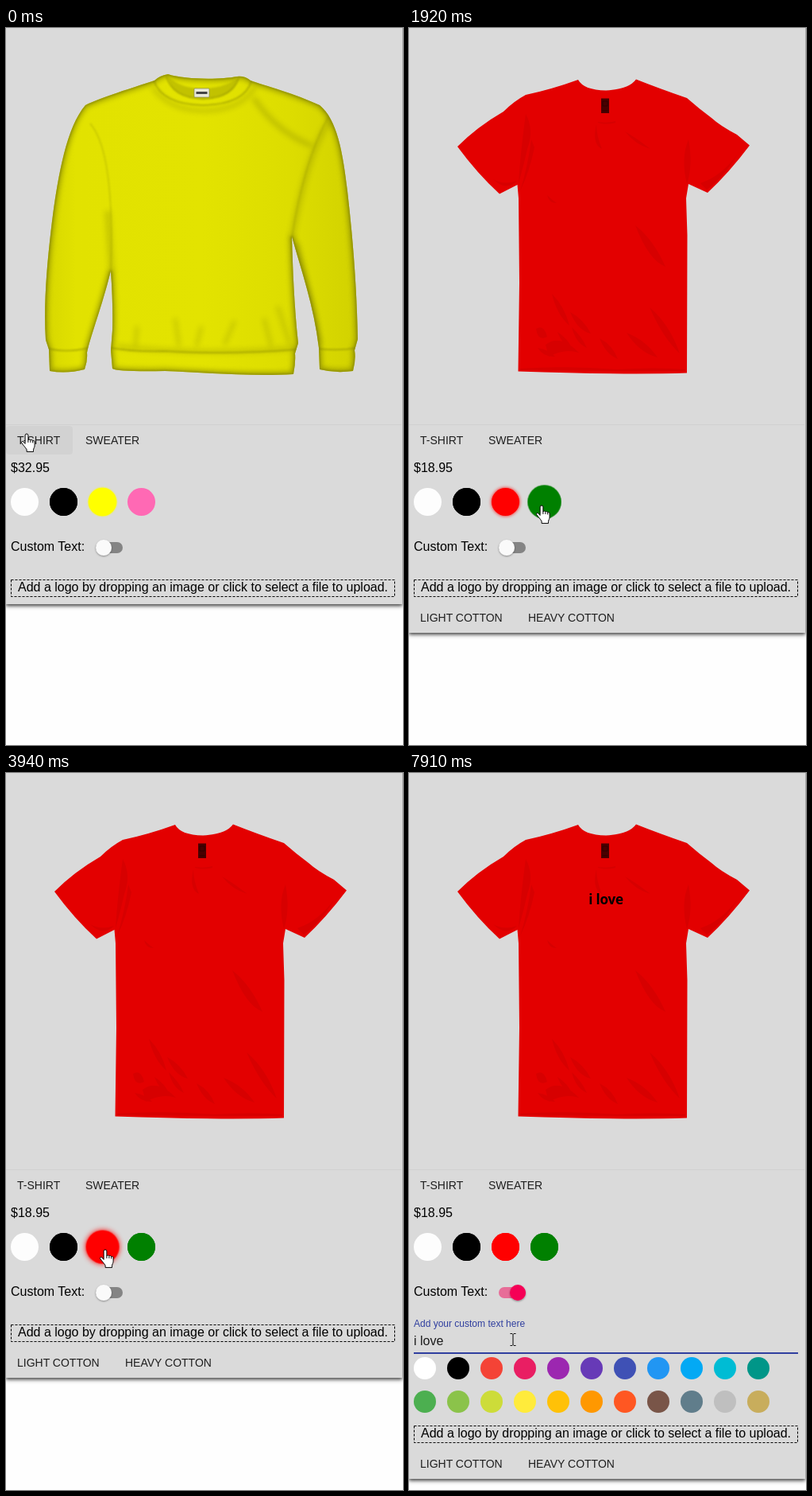
Animation, 500 px wide and 901 px high, one loop 8000 ms. Source, as an HTML page:

```html
<!DOCTYPE html>
<html lang="en">
<head>
<meta charset="utf-8">
<title>Shirt designer</title>
<style>
html, body { margin: 0; width: 100%; height: 100%; overflow: hidden; background: #fefefe; }
#stage { position: relative; width: 500px; height: 901px; overflow: hidden; }
#card { position: absolute; left: 0; top: -6px; width: 498.5px; height: 730px; background: #dadada;
  box-shadow: 0 2px 4px rgba(0,0,0,.65), 0 3px 6px rgba(0,0,0,.2); }
svg { position: absolute; left: 0; top: 0; }
text { font-family: "Liberation Sans", Arial, sans-serif; font-size: 16px; white-space: pre; }
.btn { font-size: 14px; fill: #1f1f1f; }
.hint { font-size: 12px; fill: #303f9f; }
.print { font: 700 17px "Open Sans", sans-serif; letter-spacing: -.2px; --lag: .12s; }

/* every timeline shares one 8 s loop */
#card, .step { animation: 8s step-end infinite; }
.move { animation: 8s linear infinite; }
#card { animation-name: grow; }
.sweater { animation-name: sweater; }
.tee { animation-name: tee; }
.shine { animation-name: shine; }
.dye { animation-name: dye; }
.low { animation-name: low; }
.mid { animation-name: mid; }
.drop { animation-name: drop; }
.field { animation-name: field; }
.typed { animation-name: typed; }
.caret { animation-name: caret; }
.track { animation-name: track; }
.hand { animation-name: hand; }
.arrow { animation-name: arrow; }
.beam { animation-name: beam; }
.cursor { animation-name: cursor; }
.hover { animation-name: hover; }
.ripple { animation-name: ripple; transform-origin: 32px 523px; }
.thumb { animation-name: thumb; }
.rule { animation-name: rule; }
.rule, .swatch { transform-box: fill-box; transform-origin: center; }
.swatch { animation-timing-function: ease; }
.red { animation-name: red; }
.green { animation-name: green; }
.black { animation-name: black; }
.key { animation: key 8s step-end calc(var(--d) + var(--lag, 0s)) infinite; }

@keyframes grow { 0% { height: 730px } 9.875% { height: 766px } 55.25%, 100% { height: 893px } }
@keyframes sweater { 0% { visibility: visible } 9.875%, 100% { visibility: hidden } }
@keyframes tee { 0% { visibility: hidden } 9.875%, 100% { visibility: visible } }
@keyframes shine { 0% { opacity: 1 } 18.5%, 100% { opacity: 0 } }
@keyframes dye {
  0% { fill: #e4e4e4 } 18.5% { fill: #e30000 } 27.5% { fill: #007200 }
  39.25% { fill: #000 } 47.5%, 100% { fill: #e30000 }
}
@keyframes low {
  0% { visibility: hidden } 9.875% { visibility: visible } 18.5% { visibility: hidden }
  39.25% { visibility: visible } 47.5%, 100% { visibility: hidden }
}
@keyframes mid {
  0% { visibility: hidden } 18.5% { visibility: visible } 39.25% { visibility: hidden }
  47.5%, 100% { visibility: visible }
}
@keyframes drop { 0% { transform: none } 55.25%, 100% { transform: translateY(127px) } }
@keyframes field { 0% { visibility: hidden } 55.25%, 100% { visibility: visible } }
@keyframes typed { 0% { opacity: 0 } 80.25%, 100% { opacity: 1 } }
@keyframes key { 0% { font-size: 0 } 50%, 100% { font-size: 1em } }
@keyframes caret {
  0% { opacity: 1; transform: none } 61.4% { opacity: 0 } 67.4% { opacity: 1 } 73.625% { opacity: 0; transform: none }
  80.25% { opacity: 1; transform: translateX(3.5px) } 81.875% { transform: translateX(8px) }
  85.125% { transform: translateX(11.5px) } 86.875% { transform: translateX(20.4px) }
  88.5% { transform: translateX(28.4px) } 92% { opacity: 1; transform: translateX(37px) }
  98.8%, 100% { opacity: 0; transform: translateX(37px) }
}
@keyframes track { 0% { fill: #848484 } 55.25%, 100% { fill: #e76d98 } }
@keyframes thumb {
  0%, 55% { transform: none; fill: #fafafa } 56.8%, 100% { transform: translateX(14px); fill: #f50057 }
}
@keyframes rule { 0%, 55.25% { transform: scaleX(0) } 57.5%, 100% { transform: none } }
@keyframes hover {
  0%, 8.3% { opacity: .035 } 9.5%, 12% { opacity: .085 } 15.5%, 99.99% { opacity: 0 } 100% { opacity: .035 }
}
@keyframes ripple {
  0%, 8.3% { transform: scale(.1); opacity: 0 } 8.375% { transform: scale(.2); opacity: .2 }
  10%, 10.5% { transform: scale(.555); opacity: .2 } 14% { transform: none; opacity: .08 }
  16%, 100% { transform: none; opacity: 0 }
}
@keyframes red {
  0%, 15.5% { transform: none; filter: drop-shadow(0 0 0 #f00) }
  18%, 22.2% { transform: scale(1.2); filter: drop-shadow(0 0 3px #f00) }
  23.9% { transform: none; filter: drop-shadow(0 0 2px #f00) }
  26%, 30% { transform: none; filter: drop-shadow(0 0 0 #f00) }
  31.5% { transform: scale(1.1) }
  33%, 41.8% { transform: none; filter: drop-shadow(0 0 0 #f00) }
  43.6%, 52.8% { transform: scale(1.2); filter: drop-shadow(0 0 3px #f00) }
  55%, 100% { transform: none; filter: drop-shadow(0 0 0 #f00) }
}
@keyframes green {
  0%, 22.2% { transform: none; filter: drop-shadow(0 0 0 #008000) }
  23.8% { transform: scale(1.2); filter: drop-shadow(0 0 0 #008000) }
  26%, 29% { transform: scale(1.2); filter: drop-shadow(0 0 3px #008000) }
  31%, 100% { transform: none; filter: drop-shadow(0 0 0 #008000) }
}
@keyframes black {
  0%, 32.5% { transform: none; filter: drop-shadow(0 0 0 #000) }
  35%, 41% { transform: scale(1.2); filter: drop-shadow(0 0 2px #000) }
  43%, 100% { transform: none; filter: drop-shadow(0 0 0 #000) }
}
@keyframes cursor {
  0%, 1.8% { transform: translate(26px, 510px) }
  4.875%, 11.3% { transform: translate(34px, 524px) }
  16.7%, 22% { transform: translate(122px, 597px) }
  23.9%, 29% { transform: translate(167px, 600px) }
  34%, 35.5% { transform: translate(69px, 593px) }
  40.75% { transform: translate(69px, 593px) }
  43.5%, 52.7% { transform: translate(125px, 599px) }
  54.4%, 56% { transform: translate(133px, 653px) }
  58% { transform: translate(139px, 685px) }
  59.75%, 64.9% { transform: translate(134px, 711px) }
  66.6%, 100% { transform: translate(131px, 712px) }
}
@keyframes hand {
  0% { opacity: 1 } 12.4% { opacity: 0 } 15.2% { opacity: 1 } 57%, 100% { opacity: 0 }
}
@keyframes arrow {
  0% { opacity: 0 } 12.4% { opacity: 1 } 15.2% { opacity: 0 } 57% { opacity: 1 } 59.2%, 100% { opacity: 0 }
}
@keyframes beam { 0% { opacity: 0 } 59.2%, 100% { opacity: 1 } }
</style>
</head>
<body>
<div id="stage">
<div id="card"></div>
<svg width="500" height="901" viewBox="0 0 500 901">
  <defs>
    <path id="sweat" d="M204 58Q193 60 187 66C160 75 120 87 100 97C76 125 66 185 59 235C52 290 47 345 50 392L54 404L55 431Q76 435 99 429Q103 418 102 408C107 385 121 350 132 305Q135 350 134 380L132 405L134 428Q140 432 200 431C250 433 310 438 362 435Q365 420 364 409L368 396C363 350 361 300 360 262C372 305 388 350 394 402L395 429Q415 434 437 431Q441 416 439 405L443 391C442 330 437 265 430 205C424 155 417 115 395 97C365 83 325 72 308 66Q301 60 291 61C270 65 225 65 204 58Z"/>
    <path id="shirt" d="M213 65Q220 78 248 78.500Q277 77 286 64.500Q315 76 350 88Q366 102 381 113Q392 123 413 134L429 147.500Q403 182 376 207L352 196L349 214L350.500 260L350 433.500Q270 436 137.500 431.500L139 320L138 214L136.500 197L114 208.500Q86 183 61 149Q86 124 119 105Q132 92 147 84Q180 77 213 65Z"/>
    <clipPath id="sweatClip"><use href="#sweat"/></clipPath>
    <clipPath id="btnClip"><rect y="500" width="84" height="36" rx="4"/></clipPath>
    <linearGradient id="yellow">
      <stop offset="0" stop-color="#d7d700"/><stop offset=".1" stop-color="#e2e200"/>
      <stop offset=".5" stop-color="#e3e300"/><stop offset=".78" stop-color="#dddd00"/>
      <stop offset="1" stop-color="#d2d200"/>
    </linearGradient>
    <filter id="soft" x="-20%" y="-20%" width="140%" height="140%"><feGaussianBlur stdDeviation="3"/></filter>
    <filter id="crisp" x="-20%" y="-20%" width="140%" height="140%"><feGaussianBlur stdDeviation=".8"/></filter>
    <filter id="thumbShade" x="-40%" y="-40%" width="180%" height="180%">
      <feDropShadow dx="0" dy="1" stdDeviation="1.2" flood-opacity=".4"/>
    </filter>
  </defs>

  <g class="step sweater">
    <use href="#sweat" fill="url(#yellow)"/>
    <g clip-path="url(#sweatClip)" fill="none" stroke="#7d7d00">
      <use href="#sweat" stroke-width="7" opacity=".6" filter="url(#soft)"/>
      <use href="#sweat" stroke-width="2.500" opacity=".65" filter="url(#crisp)"/>
      <g filter="url(#soft)" stroke-width="7" opacity=".28">
        <path d="M408 116C384 150 370 210 360 264M128 230L133 306M312 88Q340 130 385 148M366 270Q380 340 394 396"/>
        <path d="M185 75Q205 103 248 104Q296 104 314 74M140 400Q250 412 364 402" stroke-width="5"/>
        <path d="M342 350L358 398M325 365L334 400M275 398L288 368M240 400L246 375M213 365L218 400M165 375L163 400" stroke-width="4"/>
      </g>
      <g filter="url(#crisp)" opacity=".55" stroke-width="1.500">
        <path d="M106 120Q137 155 132 305M406 112C384 150 368 210 360 264" opacity=".5"/>
        <path d="M132 402Q160 407 200 406Q280 411 366 404M50 402Q75 409 104 402M393 403Q418 406 442 402"/>
        <path d="M186 66Q197 96 248 97Q300 96 309 67"/>
      </g>
      <path d="M204 60Q218 76 248 76Q280 75 292 61Q289 88 248 89Q207 87 204 60Z" fill="#b7b700" stroke="none" opacity=".75" filter="url(#crisp)"/>
      <path d="M202 61Q210 88 248 89Q285 88 293 63" stroke-width="1.500" opacity=".55" filter="url(#crisp)"/>
    </g>
    <rect x="237" y="76" width="19" height="11" rx="1" fill="#e9e9d8" stroke="#89895a" stroke-width=".7"/>
    <rect x="239.500" y="80" width="14" height="3" fill="#444"/>
  </g>

  <g class="step tee">
    <use href="#shirt" class="step dye"/>
    <g class="step shine" fill="#fff" opacity=".3">
      <g opacity=".3">
        <path d="M204 78Q216 98 212 132Q225 108 217 80ZM318 86Q324 110 350 132Q340 108 328 90ZM290 80Q300 98 322 112Q312 92 300 78ZM158 92Q178 98 205 117Q184 96 160 88ZM353 106Q365 130 400 145Q380 122 355 100ZM94 140Q120 136 145 122Q135 145 110 150Z"/>
        <path d="M213 66Q221 88 248 89Q276 88 286 66" fill="none" stroke="#fff" stroke-width="3"/>
      </g>
    </g>
    <g opacity=".05">
      <path d="M285 248Q308 266 323 300Q302 292 285 248ZM180 334Q196 350 202 374Q186 360 180 334ZM203 357Q220 366 229 384Q212 380 203 357ZM240 390Q256 398 263 416Q248 410 240 390ZM303 351Q328 372 341 409Q320 390 303 351ZM274 383Q298 392 313 414Q290 408 274 383ZM205 376Q218 388 224 402Q210 396 205 376Z"/>
      <path d="M147 108Q158 128 149 152Q144 175 138 195Q140 160 147 108ZM154 140Q150 172 140 205Q152 180 158 150ZM106 190Q120 198 136 192Q122 206 106 190ZM352 140Q342 164 350 196Q358 172 352 140ZM367 195Q394 186 414 158Q396 188 375 203ZM238 118Q250 120 260 117V119Q248 122 238 119Z"/>
      <path d="M160 378Q170 372 174 388Q162 394 160 378ZM172 398Q190 384 214 408Q196 402 176 413ZM162 402Q176 404 184 413Q170 414 162 402ZM187 382Q200 390 206 404Q194 400 187 382ZM140 428Q200 424 262 429Q310 426 348 429V431Q240 431 140 430Z"/>
      <path d="M236 121Q230 146 243 152Q236 135 236 121ZM272 130Q286 138 304 152Q284 146 272 130ZM174 210Q180 216 186 220Q176 220 174 210Z"/>
    </g>
    <rect x="242" y="88.500" width="10" height="18.500" opacity=".68"/>
    <path d="M244 92h6v6h-6zM243.500 104h7" fill="none" stroke="#000" opacity=".35"/>
  </g>

  <text class="step typed print" x="248" y="165" text-anchor="middle"><tspan class="key" style="--d:2.42s">i</tspan><tspan class="key" style="--d:2.55s"> </tspan><tspan class="key" style="--d:2.81s">l</tspan><tspan class="key" style="--d:2.95s">o</tspan><tspan class="key" style="--d:3.08s">v</tspan><tspan class="key" style="--d:3.36s">e</tspan></text>

  <path d="M0 498.500H498" stroke="#d0d0d0"/>
  <g clip-path="url(#btnClip)">
    <rect class="move hover" y="500" width="84" height="36"/>
    <circle class="move ripple" cx="32" cy="523" r="56"/>
  </g>
  <text class="btn" x="14" y="523">T-SHIRT</text>
  <text class="btn" x="100" y="523">SWEATER</text>

  <text class="step sweater" x="6" y="558">$32.95</text>
  <text class="step low" x="6" y="558">$16.95</text>
  <text class="step mid" x="6" y="558">$18.95</text>

  <circle cx="23.500" cy="595.500" r="17.500" fill="#fdfdfd"/>
  <circle class="move swatch black" cx="72.500" cy="595.500" r="17.500"/>
  <g class="step sweater">
    <circle cx="121.500" cy="595.500" r="17.800" fill="#ff0" style="filter:drop-shadow(0 0 1px #ff0)"/>
    <circle cx="170.500" cy="595.500" r="17.500" fill="#ff69b4"/>
  </g>
  <g class="step tee">
    <circle class="move swatch red" cx="121.500" cy="595.500" r="17.500" fill="#f00"/>
    <circle class="move swatch green" cx="170.500" cy="595.500" r="17.500" fill="#008000"/>
  </g>

  <text x="6" y="657">Custom Text:</text>
  <rect class="step track" x="113" y="646" width="34" height="14" rx="7"/>
  <circle class="move thumb" cx="123" cy="653" r="10" filter="url(#thumbShade)"/>

  <g class="step field">
    <text class="hint" x="6" y="696">Add your custom text here</text>
    <text class="step typed" x="6" y="719" fill="#1d1d1d"><tspan class="key" style="--d:2.42s">i</tspan><tspan class="key" style="--d:2.55s"> </tspan><tspan class="key" style="--d:2.81s">l</tspan><tspan class="key" style="--d:2.95s">o</tspan><tspan class="key" style="--d:3.08s">v</tspan><tspan class="key" style="--d:3.36s">e</tspan></text>
    <rect class="step caret" x="6" y="705" width="1" height="17"/>
    <rect class="move rule" x="6" y="728" width="484" height="2" fill="#303f9f"/>
    <g id="inks"></g>
  </g>

  <g class="step drop">
    <rect x="6.500" y="693.500" width="483" height="21" fill="none" stroke="#000" stroke-dasharray="3 2"/>
    <text x="248" y="708" text-anchor="middle">Add a logo by dropping an image or click to select a file to upload.</text>
    <g class="step tee">
      <text class="btn" x="14" y="746">LIGHT COTTON</text>
      <text class="btn" x="150" y="746">HEAVY COTTON</text>
    </g>
  </g>

  <g class="move cursor" fill="#fff" stroke="#000" stroke-linejoin="round">
    <g class="step hand">
      <path transform="translate(-7.400 -.600)" d="M5.500 12V2.500a1.900 1.900 0 0 1 3.800 0V8.600a1.600 1.600 0 0 1 3 .2a1.600 1.600 0 0 1 2.800.6a1.500 1.500 0 0 1 2.400 1.200V15.500c0 2-1.600 3.500-1.600 5.500V23H7.500V20.500C6 17.500 2.500 14.500 1 11.800c-.6-1.400 1-2.400 2.200-1.400L5.500 13ZM9.300 8.600V11.500M12.300 9V11.500M15.100 9.600V12"/>
    </g>
    <path class="step arrow" d="M0 0V16.500L3.800 12.900L6.400 18.900L9 17.700L6.400 11.900H11.600Z"/>
    <path class="step beam" fill="none" d="M-3.500-7.500h2.500l1 1l1-1h2.500M0-6.500V6.500M-3.500 7.500h2.500l1-1l1 1h2.500"/>
  </g>
</svg>
</div>
<script>
const inks = `#fff #000 #f44336 #e91e63 #9c27b0 #673ab7 #3f51b5 #2196f3 #03a9f4 #00bcd4 #009688
  #4caf50 #8bc34a #cddc39 #ffeb3b #ffc107 #ff9800 #ff5722 #795548 #607d8b #bfbfbf #c8ad5c`.split(/\s+/);
document.getElementById("inks").innerHTML = inks.map((ink, i) =>
  `<circle cx="${20 + i % 11 * 42}" cy="${i < 11 ? 748 : 790}" r="14" fill="${ink}"/>`).join("");
</script>
</body>
</html>
```
